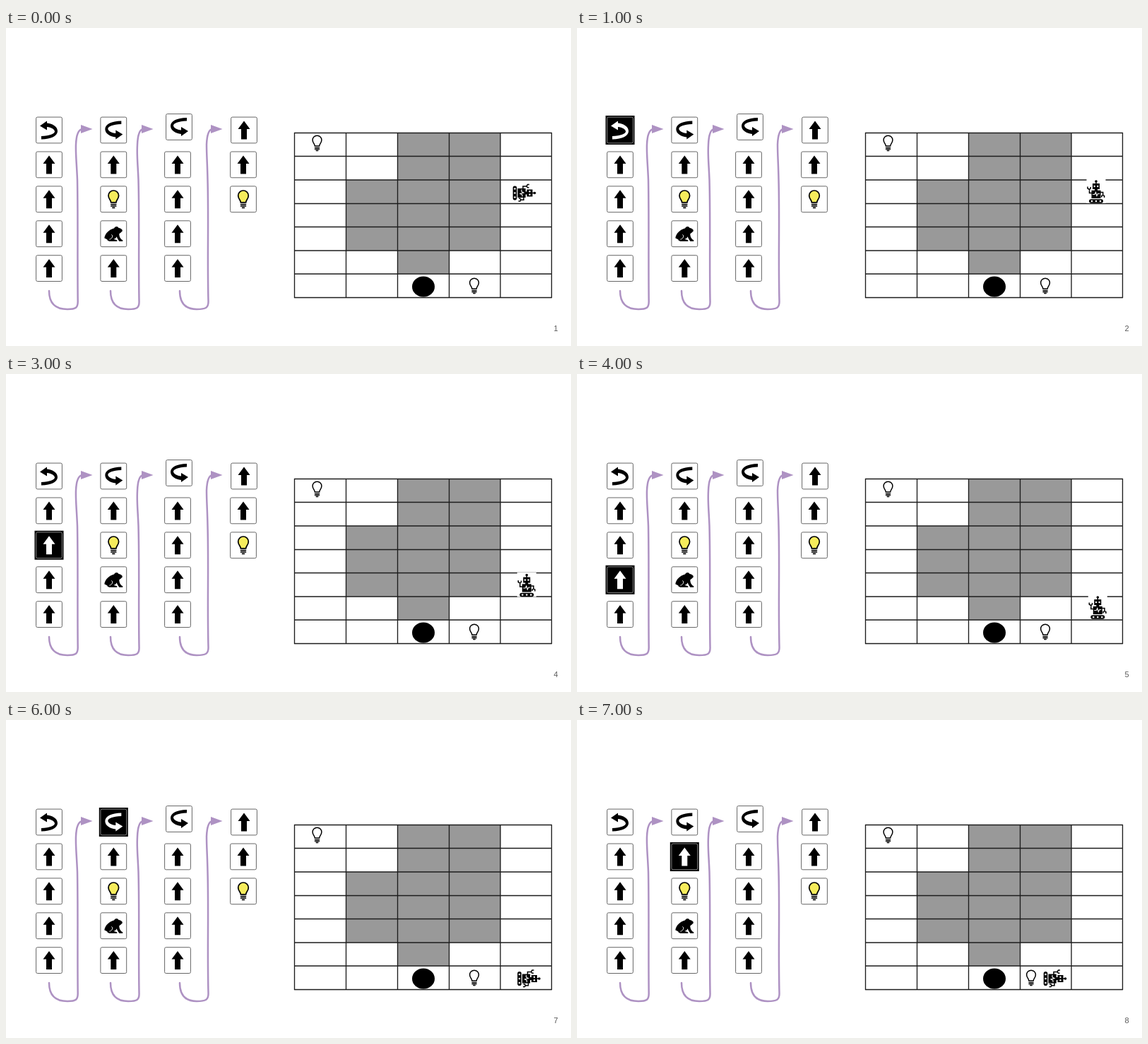
Write an HTML page that moves like this. It is 800 px wide and 450 px high and loops after 8000 ms.

```html
<!DOCTYPE html>
<html lang="en">
<head>
<meta charset="utf-8">
<title>Robot program</title>
<style>
  html, body { margin: 0; width: 100%; height: 100%; overflow: hidden; background: #fff; }
  svg { display: block; width: 800px; height: 450px; }
  .tile { color: #000; }
  .back { fill: none; }
  .frame { fill: #fff; stroke: #666; }
  .on { color: #fff; }
  .on .back { fill: #000; }
  .on .frame { fill: #000; stroke: #aaa; stroke-width: .8; }
  .flow { fill: none; stroke: #ae92c3; stroke-width: 2.5; stroke-linecap: round; }
  .head { fill: #ae92c3; }
  .grid { fill: none; stroke: #1c1c1c; stroke-width: 1.35; }
  text { font: 11px "Liberation Sans", Arial, sans-serif; fill: #595959; }
</style>
</head>
<body>
<svg viewBox="0 0 800 450">
  <defs>
    <path id="up" fill="currentColor" d="M0-13L8.5-1.5H4V13H-4V-1.5H-8.5Z"/>
    <path id="right" fill="currentColor" d="M11-13C-3-13-12-8-12-1.5C-12 5-5 9 3 10V13L13 6L3 0V4.5C-3 4-8 1-8-2C-8-5-1-8 11-8.5Z"/>
    <use id="left" href="#right" transform="rotate(180)"/>
    <g id="bulb" stroke="#000" stroke-linecap="round">
      <path stroke-width="1.5" d="M-3.2 4C-3.2 1-6.4-.5-6.4-4.4A6.4 6.4 0 0 1 6.4-4.4C6.4-.5 3.2 1 3.2 4Z"/>
      <path fill="none" stroke-width="1.5" d="M-3 6.4H3M-3 8.5H3M-1.2 10.5H1.2"/>
    </g>
    <use id="lamp" href="#bulb" fill="#f6ec5c" transform="scale(1.14)"/>
    <g id="frog">
      <path fill="currentColor" d="M-13 6C-12-1-6-6 1-8C2-11 6-11 7-8.5C10-8 13-6 12.5-4C11-2 9-1 8 0C8 3 9 7 13 9V10.5H8C6 8 5 5 4 4C4 6 2 7 0 7.5L5 9V10.5H-6C-8 10-9 9-9 8Z"/>
      <path fill="none" stroke="#fff" stroke-width=".9" d="M-6 8C-2 7 0 3-3 1"/>
    </g>
    <g id="robot">
      <path fill="#fff" d="M-13.5-18H13.5V16.5H-13.5Z"/>
      <circle cy="-14.5" r="1.8"/>
      <path d="M-.7-14H.7V-11H-.7ZM-5-11.5H5V-3.5H-5ZM-2-4H2V-1H-2ZM-6.5-1.7H6.5V9.5H-6.5Z"/>
      <rect x="-10" y="10.7" width="20" height="5.6" rx="2.8"/>
      <path fill="none" stroke="#000" stroke-width="1.5" d="M-6 2H-9.5V-3M-12-7V-4.5L-9.5-3L-7.8-4.5V-6.5M6 1H9.7V5M7.8 8V6L9.7 5L11.6 6V8.5"/>
      <path fill="none" stroke="#fff" stroke-width="1.1" d="M-5 4H-2L-.5 1L1 6L2.5 3H5"/>
      <g fill="#fff">
        <circle cx="-2.3" cy="-7.5" r="1.2"/><circle cx="2.3" cy="-7.5" r="1.2"/>
        <circle cx="-6" cy="13.5" r="1.3"/><circle cy="13.5" r="1.3"/><circle cx="6" cy="13.5" r="1.3"/>
      </g>
    </g>
  </defs>

  <g id="tiles"></g>
  <path class="flow" d="M61 372C61 387 67 398 87 398C99 398 102 396 101.7 386C101 330 102 270 101 215C100 190 98.500 180 99 165C99.500 151 102 144 108 143"/>
  <path class="flow" d="M148 372C148 387 154 398 173 398C186 398 189 396 188.500 386C187.500 330 189 270 187.500 215C186.500 190 185 180 186 165C186.500 151 189 144 194 143"/>
  <path class="flow" d="M246 372C246 387 252 398 270 398C283 398 287 396 286.500 386C285 330 287 270 285.500 215C285 190 284 180 284 165C284.500 151 287 144 292 143"/>
  <path class="head" d="M106 137L122.500 143L106 149ZM192 137L208.500 143L192 149ZM290 137L306.500 143L290 149Z"/>

  <path fill="#999" d="M554.500 148.500H700V315H627.500V348H554.500V315H481.500V215H554.500Z"/>
  <path class="grid" id="grid"/>
  <ellipse cx="591" cy="366" rx="16" ry="14.500"/>
  <use href="#bulb" fill="#fff" x="440.500" y="163"/>
  <use href="#bulb" fill="#fff" id="goal"/>
  <use href="#robot" id="bot"/>
  <text id="page" x="775.500" y="429"></text>
</svg>
<script>
const $ = id => document.getElementById(id);
const STEP = 1000;

const columns = [
  { x: 61, top: [61, 144.5], icons: ['left', 'up', 'up', 'up', 'up'] },
  { x: 152.3, top: [152.3, 144.5], icons: ['right', 'up', 'lamp', 'frog', 'up'] },
  { x: 243, top: [245, 140], icons: ['right', 'up', 'up', 'up', 'up'] },
  { x: 336, top: [337, 144.5], icons: ['up', 'up', 'lamp'] }
];

// Robot pose per step: x, y, angle
const poses = [
  [734, 233.5, 90], [735, 231.5, 0], [735, 264.7, 0], [737.3, 299, 0],
  [737.3, 330.5, 0], [737.3, 364.5, 0], [740.5, 366, 90], [677, 366, 90]
];

$('tiles').innerHTML = columns.map(c => c.icons.map((icon, i) => {
  const [x, y] = i ? [c.x, 144.5 + 48.9 * i] : c.top;
  return `<g class="tile" transform="translate(${x} ${y})">
    <path class="back" d="M-20.5-20.5H20.5V20.5H-20.5Z"/>
    <rect class="frame" x="-18.4" y="-18.4" width="36.8" height="36.8" rx="2"/>
    <use href="#${icon}"/></g>`;
}).join('')).join('');

const xs = [408.5, 481.5, 554.5, 627.5, 700, 772.5];
const ys = [148.5, 181.5, 215, 248.5, 281.5, 315, 348, 381.5];
$('grid').setAttribute('d',
  xs.map(x => `M${x} 148V382`).join('') + ys.map(y => `M408 ${y}H773`).join(''));

const tiles = document.querySelectorAll('.tile');
let shown = -1;

function show(n) {
  const [x, y, angle] = poses[n];
  tiles.forEach((tile, i) => tile.classList.toggle('on', i === n - 1));
  $('bot').setAttribute('transform', `translate(${x} ${y}) rotate(${angle})`);
  $('goal').setAttribute('transform', `translate(${n === 7 ? 643 : 663} 365)`);
  $('page').textContent = n + 1;
  shown = n;
}

function tick() {
  const n = Math.floor(performance.now() / STEP) % poses.length;
  if (n !== shown) show(n);
  requestAnimationFrame(tick);
}
tick();
</script>
</body>
</html>
```
